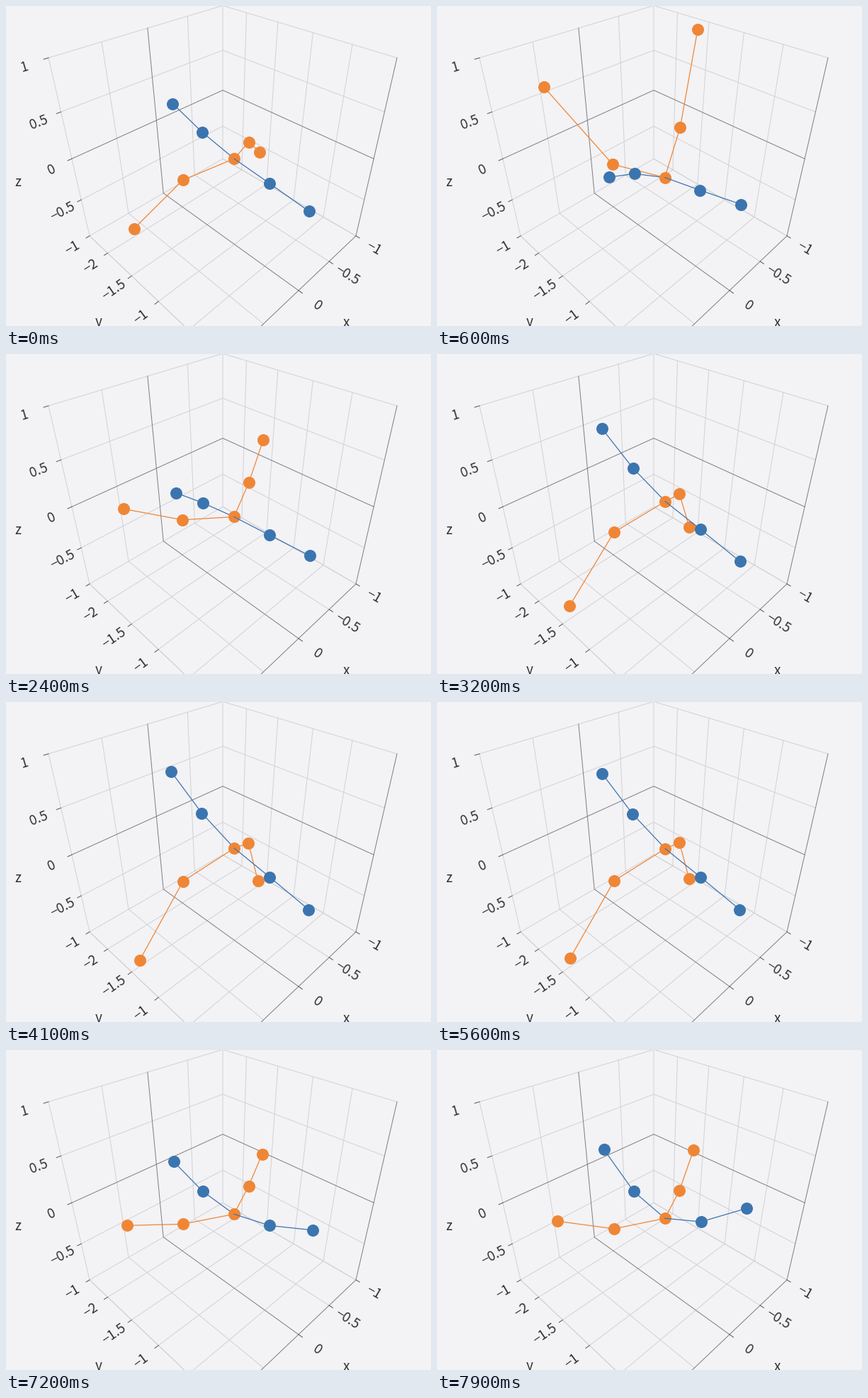
A matplotlib script that plays this animation: 600 by 451 pixels, repeating every 8000 ms.

```python
import numpy as np
import matplotlib.pyplot as plt
from matplotlib.animation import FuncAnimation

W, H, DPI = 600, 451, 100
PX = 72 / DPI
BG, GRID, ZERO, INK = "#f3f2f5", "#d2d2d4", "#7f7f81", "#333333"
BLUE, ORANGE = "#3b75af", "#ef8636"
FONT = 19 * PX
Y_MIN = -2.415

plt.rcParams["font.family"] = ["Noto Sans CJK JP", "DejaVu Sans"]
fig = plt.figure(figsize=(W / DPI, H / DPI), dpi=DPI, facecolor=BG)
ax = fig.add_axes([0, 0, 1, 1])
ax.set_xlim(0, W)
ax.set_ylim(H, 0)
ax.axis("off")


def project(x, y, z):
    """Perspective view along the diagonal of the box; gives pixels."""
    p, q = (x + 1) / 2, 1 - y / Y_MIN
    w = 1 - .216 * (p + q) - .1048 * z
    return np.array([306 + 167.1 * (q - p) / w,
                     (118.7 + 50.1 * (p + q) - 119.2 * z) / w])


def path(points, color=GRID, width=1.0, z=1):
    ax.plot(*zip(*(project(*p) for p in points)), color=color,
            lw=width * PX, zorder=z)


def grid_line(value, *points):
    path(points, *((ZERO, 1.0, 2) if value == 0 else (GRID,)))


def tick(value, point, outward):
    """Short mark and a label that leans along the outward direction."""
    point, outward = np.array(point), np.array(outward)
    path([point, point + .2 * outward], "#555555", z=3)
    a, b = project(*point), project(*(point + outward))
    angle = -np.degrees(np.arctan((b[1] - a[1]) / (b[0] - a[0])))
    ax.text(*b, f"{value:g}".replace("-", "\u2212"), color=INK, fontsize=FONT,
            rotation=angle, rotation_mode="anchor", ha="center",
            va="center_baseline")


for v in np.linspace(-1, 1, 5):
    grid_line(v, (1, Y_MIN, v), (-1, Y_MIN, v), (-1, 0, v))
    grid_line(v, (v, Y_MIN, 1), (v, Y_MIN, -1), (v, 0, -1))
    tick(v, (1, Y_MIN, v), (.21, 0, 0))
    if v <= 0:
        tick(v, (v, 0, -1), (0, .265, 0))
for v in np.linspace(-2, 0, 5):
    grid_line(v, (-1, v, 1), (-1, v, -1), (1, v, -1))
    if v <= -1:
        tick(v, (1, v, -1), (.21, 0, 0))
path([(1, Y_MIN, -1), (1, 0, -1)])

for x, y, name in ((17, 254, "z"), (131, 451, "y"), (480, 452, "x")):
    ax.text(x, y, name, color=INK, fontsize=FONT, ha="center", va="baseline")

# Two chains crossing at their middle bead
ORANGE_X = np.array([1.12, .61, 0, -.19, -.36])
BLUE_Y = np.linspace(-2.05, -.01, 5)
MIDDLE = BLUE_Y[2]

# Height of each chain at rest and its change per unit of each vibration mode
REST = np.array([.39, .22, 0, .22, .39])
SWAY = np.array([-5.65, -.74, 1, -.74, -5.65]), np.array([4.25, 2.3, 1, .35, -.35])
CUP = np.array([.8, -1, -1, -1, .8]), np.array([2.85, -.03, -1, .84, 4.3])
AMP, SLOW_AT, CUP_AT = .148, 2.7, 6.53


def vibration(t):
    """Fast sway, then slow sway, then a cut to the cupping mode."""
    if t > CUP_AT:
        return CUP, AMP * np.sin(np.radians(32.4 * (t - CUP_AT)))
    phase = 60 + 231 * min(t, SLOW_AT) + 18.8 * max(t - SLOW_AT, 0)
    return SWAY, AMP * np.cos(np.radians(phase))


def chain(color, z):
    return ax.plot([], [], color=color, lw=1.25 * PX, zorder=z)[0]


def beads(color, z):
    return ax.plot([], [], "o", color=color, ms=17 * PX, mew=0, zorder=z)[0]


blue_back, orange_line, orange_dots = chain(BLUE, 4), chain(ORANGE, 5), beads(ORANGE, 6)
blue_front, blue_dots = chain(BLUE, 7), beads(BLUE, 8)


def draw(k):
    (orange_mode, blue_mode), a = vibration(k / 10)
    orange = project(ORANGE_X, MIDDLE, REST + a * orange_mode)
    blue = project(0, BLUE_Y, a * blue_mode)
    orange_line.set_data(*orange)
    orange_dots.set_data(*orange)
    blue_back.set_data(*blue[:, :3])
    blue_front.set_data(*blue[:, 2:])
    blue_dots.set_data(*np.delete(blue, 2, axis=1))
    return blue_back, orange_line, orange_dots, blue_front, blue_dots


anim = FuncAnimation(fig, draw, frames=80, interval=100, repeat=True,
                     repeat_delay=0, blit=False)
plt.show()
```
